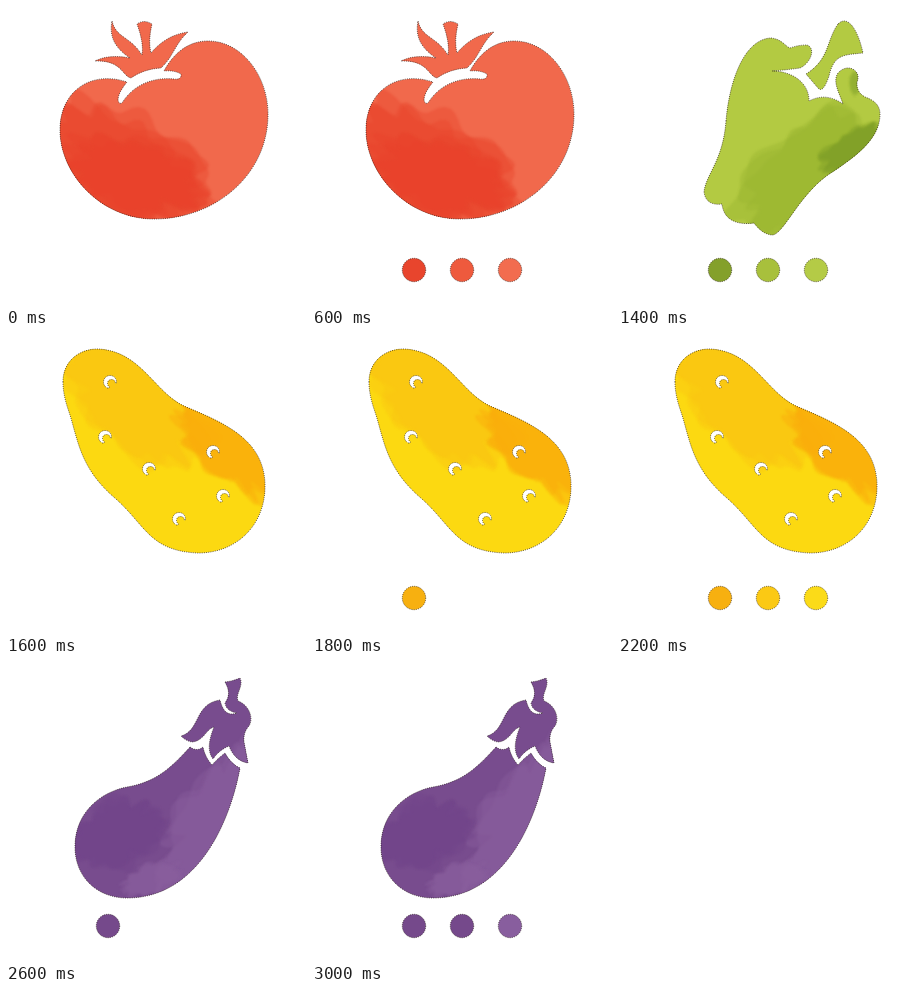
An HTML page with a canvas for the animation above (3200 ms loop, 300 by 300 pixels).

```html
<!DOCTYPE html>
<html lang="en">
<head>
<meta charset="utf-8">
<title>Vegetables</title>
<style>
html, body { margin: 0; width: 100%; height: 100%; overflow: hidden; background: #fff; }
canvas { display: block; width: 300px; height: 300px; }
</style>
</head>
<body>
<canvas width="300" height="300"></canvas>
<script>
const ctx = document.querySelector('canvas').getContext('2d');
const STEP = 200, HOLD = 800, TURN = 2 * Math.PI;

let seed = 11;
const random = () => (seed = seed * 16807 % 2147483647) / 2147483647;

// An ellipse whose rim is roughened by a sum of sine waves.
function blot(x, y, rx, ry, tilt) {
  const path = new Path2D(), rim = new Path2D();
  const waves = Array.from({ length: 14 }, (_, i) => [i + 3, random() * TURN]);
  for (let a = 0; a < TURN; a += TURN / 120) {
    const r = waves.reduce((sum, [k, phase]) => sum + .13 / Math.sqrt(k) * Math.sin(k * a + phase), 1);
    rim.lineTo(rx * r * Math.cos(a), ry * r * Math.sin(a));
  }
  path.addPath(rim, new DOMMatrix().translate(x, y).rotate(tilt));
  return path;
}

// Layered blots give the stepped rim of a dried watercolour wash.
const wash = (color, ...ellipse) =>
  ({ color, layers: Array.from({ length: 3 }, () => blot(...ellipse)) });

// A crescent hook, open towards the lower right.
function eye(x, y) {
  const path = new Path2D();
  path.arc(x, y, 6.5, TURN * .3, TURN * 1.02);
  path.arc(x + 1.5, y + 1.5, 4, TURN, TURN * .32, true);
  path.closePath();
  return path;
}

const tomato = {
  base: '#f1694c',
  dots: ['#e8452d', '#ee5a3d', '#f26c4f'],
  path: new Path2D(`M121 76 Q112 87 112 94 C113 99 116 98 118 94 C130 77 150 71 168 73 Q176 74 175 68
    Q168 64 158 65 C166 50 180 35 202 35 C236 35 262 70 262 108 C262 170 208 213 148 213
    C95 213 54 168 54 124 C54 85 85 64 121 76Z
    M106 15 C110 32 124 30 136 49 Q138 37 131 18 Q138 13 146 18 Q142 35 145 47 Q160 29 182 26
    C168 39 168 50 155 62 Q138 63 125 72 C116 70 116 54 89 55 Q103 48 124 52 C109 42 103 31 106 15Z`),
  washes: [
    wash('#e9442c', 112, 160, 95, 50, 25),
    wash('#e8432c', 128, 170, 66, 34, 15)
  ]
};

const pepper = {
  base: '#b3ca42',
  dots: ['#84a02b', '#a8c03c', '#b4cb46'],
  path: new Path2D(`M108 115 C112 70 128 33 153 32 C164 33 168 41 172 42 Q180 39 189 39
    C198 42 193 57 182 62 Q168 64 154 65 C172 65 191 75 191 95 Q208 86 225 98
    C222 88 214 76 220 67 C230 56 244 65 239 76 Q238 86 247 91 Q262 96 262 108
    C262 133 238 150 216 165 C182 185 166 229 154 229 Q144 228 136 217
    C122 219 106 216 104 198 Q88 200 86 186 C88 168 105 155 108 115Z
    M220 18 C230 8 240 24 245 47 C226 49 216 48 211 70 Q205 88 200 82 L188 68 C212 53 208 35 220 18Z`),
  washes: [
    wash('#98b431', 195, 172, 85, 50, -40),
    wash('#7c9c27', 234, 144, 34, 17, -35),
    wash('#8cab2f', 237, 77, 5, 11, 0)
  ]
};

const potato = {
  base: '#fcd911',
  dots: ['#f7b010', '#fbc914', '#fbdb18'],
  path: new Path2D(`M57 48 C57 28 72 15 92 15 C135 17 148 58 178 72 C215 88 259 104 259 152
    C259 192 230 219 192 219 C144 217 140 192 110 165 C72 133 72 103 62 75 C59 66 57 57 57 48Z`),
  washes: [
    wash('#fbc412', 125, 65, 85, 42, 45),
    wash('#f9a90a', 220, 114, 62, 26, 45)
  ],
  eyes: [eye(104, 48), eye(99, 103), eye(143, 135), eye(207, 118), eye(217, 162), eye(173, 185)]
};

const eggplant = {
  base: '#784c8e',
  dots: ['#75498b', '#75498b', '#885e9e'],
  path: new Path2D(`M184 85 Q191 90 197 85 Q199 95 206 103 Q211 97 219 91 Q225 102 234 106
    C224 160 192 236 121 236 C91 236 69 215 69 185 C69 150 95 130 121 125 C150 120 165 106 184 85Z
    M219 20 Q227 19 234 16 C238 24 229 32 232 39 C243 43 248 56 243 64 Q237 70 238 80 L242 101
    Q229 99 223 84 Q213 88 207 97 Q199 87 208 65 C200 67 198 79 186 80 Q180 79 175 74
    C195 68 188 42 214 38 C217 50 222 54 231 51 Q220 49 219 41 Q226 32 219 20Z`),
  washes: [
    wash('#8a609f', 205, 160, 85, 32, -60),
    wash('#8a609f', 145, 217, 28, 14, -20),
    wash('#70458a', 112, 172, 46, 30, -20)
  ]
};

const vegetables = [tomato, pepper, potato, eggplant];

function dottedEdge(path) {
  ctx.strokeStyle = 'rgba(30,20,15,.75)';
  ctx.lineWidth = .9;
  ctx.setLineDash([1, 1.2]);
  ctx.stroke(path);
}

function fillDotted(path, color) {
  ctx.fillStyle = color;
  ctx.fill(path);
  dottedEdge(path);
}

function drawVegetable({ base, path, washes, eyes = [] }) {
  ctx.save();
  ctx.clip(path);
  ctx.fillStyle = base;
  ctx.fillRect(0, 0, 300, 300);
  ctx.globalAlpha = .4;
  ctx.filter = 'blur(1px)';
  for (const { color, layers } of washes) {
    ctx.fillStyle = color;
    layers.forEach(layer => ctx.fill(layer));
  }
  ctx.restore();
  eyes.forEach(hook => fillDotted(hook, '#fff'));
  dottedEdge(path);
}

function drawDots(colors) {
  colors.forEach((color, i) => {
    const dot = new Path2D();
    dot.arc(102 + 48 * i, 264, 11.7, 0, TURN);
    fillDotted(dot, color);
  });
}

let shown = -1;
const start = performance.now();

function frame() {
  const time = Math.max(0, performance.now() - start) % (HOLD * vegetables.length);
  const step = Math.floor(time / STEP);
  if (step !== shown) {
    shown = step;
    const vegetable = vegetables[Math.floor(time / HOLD)];
    ctx.clearRect(0, 0, 300, 300);
    drawVegetable(vegetable);
    drawDots(vegetable.dots.slice(0, step % (HOLD / STEP)));
  }
  requestAnimationFrame(frame);
}
frame();
</script>
</body>
</html>
```
